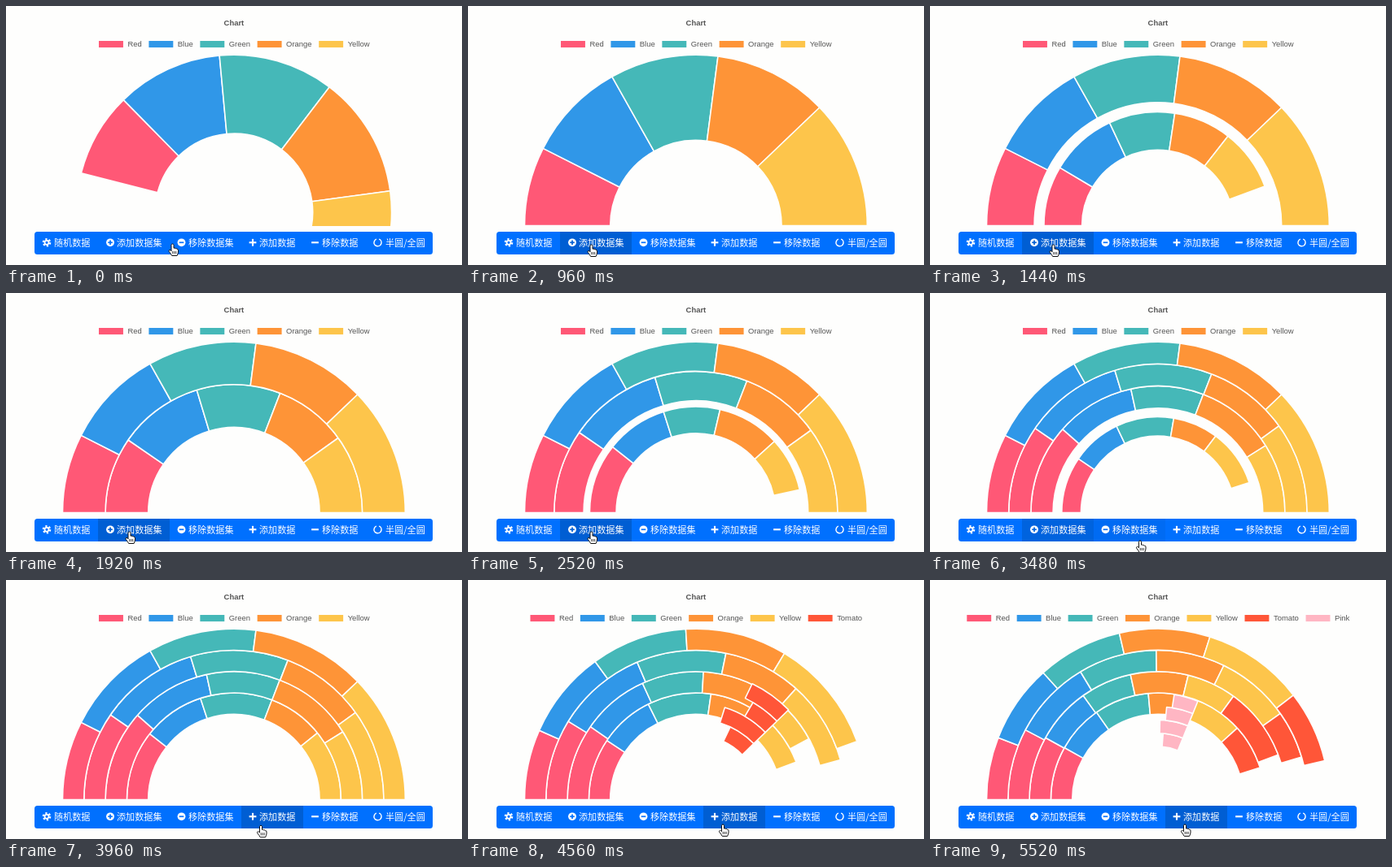
An HTML page with a canvas that plays this animation: 560x319 px, repeating every 5.64 s.

```html
<!DOCTYPE html>
<html lang="zh-CN">
<head>
<meta charset="utf-8">
<title>Chart</title>
<style>
  html, body { margin: 0; height: 100%; overflow: hidden; background: #fefefd; }
  canvas { display: block; }
</style>
</head>
<body>
<canvas width="560" height="319"></canvas>
<script>
const ctx = document.querySelector('canvas').getContext('2d');
const LOOP = 5640, STEP = 120, EASE_MS = 1000;
const BG = '#fefefd', SCALE = 0.787, FONT = 12 * SCALE, BORDER = 2 * SCALE;
const CX = 279.9, TOP = 60.2, RADIUS = 210.4, CHART_BOTTOM = 271;

const labels = [
  ['Red', '#ff5876'], ['Blue', '#3097e8'], ['Green', '#45b8b8'], ['Orange', '#fe9437'],
  ['Yellow', '#fdc54b'], ['Tomato', '#ff5638'], ['Pink', '#ffb6c3']
];

// One row of values per ring, outermost first.
const values = [
  [26.9, 33.8, 36.7, 38.8, 43.8, 31, 28.2],
  [34.6, 38.6, 37.9, 33.2, 35.7, 23.1, 35.4],
  [41.3, 36.4, 33.2, 37.1, 32, 47.7, 51.1],
  [38.1, 33.7, 39, 30.5, 38.7, 32.2, 39.3]
];

// Each click starts a transition from the previous state to this one.
const states = [
  { at: -2000, rings: 1, slices: 5, full: true },
  { at: -368, rings: 1, slices: 5 },
  { at: 1020, rings: 2, slices: 5 },
  { at: 2034, rings: 3, slices: 5 },
  { at: 3045, rings: 4, slices: 5 },
  { at: 4264, rings: 4, slices: 6 },
  { at: 5304, rings: 4, slices: 7 }
];

const buttons = [
  { x: 35, icon: 'gear', iconX: 50, text: '随机数据', textX: 59 },
  { x: 113, icon: 'plusCircle', iconX: 128, text: '添加数据集', textX: 136, hover: [40, 3440] },
  { x: 201, icon: 'minusCircle', iconX: 215.5, text: '移除数据集', textX: 224, hover: [3440, 3615] },
  { x: 289, icon: 'plus', iconX: 303, text: '添加数据', textX: 311, hover: [3615, LOOP] },
  { x: 365, icon: 'minus', iconX: 379.5, text: '移除数据', textX: 388 },
  { x: 441, icon: 'notch', iconX: 456.5, text: '半圆/全圆', textX: 466 }
];
const BAR = { x: 35, y: 278, right: 524, h: 28 };

// time, fingertip x, fingertip y
const pointerPath = [
  [0, 204.5, 293], [300, 151.5, 294], [3240, 151.5, 294],
  [3480, 258, 305], [3720, 313, 305], [4080, 313, 301], [LOOP, 313, 301]
];
const hand = new Path2D('M-1.5 1.3Q-1.3 0 0 0T1.5 1.3V5.2Q2.8 4.6 3.7 5.7Q5 5.2 5.6 6.4Q7 6.2 7 7.8V10Q6.8 12 5.6 14.5H-.8Q-1.8 12.4-4.3 9.4Q-5 8-3.6 7.5Q-2.5 7.4-1.5 8.8Z');

const clamp = v => Math.min(1, Math.max(0, v));
const mix = (a, b, p) => a + (b - a) * p;
const sum = list => list.reduce((a, b) => a + b, 0);

function arcGeometry(state, ring, slice) {
  if (ring >= state.rings || slice >= state.slices) {
    return { start: -Math.PI, end: -Math.PI, outer: 0, inner: 0 };
  }
  const row = values[ring].slice(0, state.slices);
  const before = sum(row.slice(0, slice));
  const rotation = state.full ? -Math.PI / 2 : -Math.PI;
  const unit = (state.full ? 2 : 1) * Math.PI / sum(row);
  const radius = state.full ? RADIUS / 2 : RADIUS;
  const thickness = radius / 2 / state.rings;
  const outer = radius - thickness * ring;
  return {
    start: rotation + before * unit,
    end: rotation + (before + row[slice]) * unit,
    outer,
    inner: outer - thickness
  };
}

function drawArc(arc, cy, color) {
  ctx.beginPath();
  ctx.arc(CX, cy, arc.outer, arc.start, arc.end);
  ctx.arc(CX, cy, arc.inner, arc.end, arc.start, true);
  ctx.closePath();
  ctx.fillStyle = color;
  ctx.fill();
  ctx.strokeStyle = BG;
  ctx.lineWidth = BORDER;
  ctx.lineJoin = 'bevel';
  ctx.stroke();
}

function drawChart(from, to, p) {
  const centerY = s => TOP + (s.full ? RADIUS / 2 : RADIUS);
  const cy = mix(centerY(from), centerY(to), p);
  ctx.save();
  ctx.beginPath();
  ctx.rect(0, 0, 560, CHART_BOTTOM);
  ctx.clip();
  for (let ring = to.rings - 1; ring >= 0; ring--) {
    for (let slice = 0; slice < to.slices; slice++) {
      const a = arcGeometry(from, ring, slice), b = arcGeometry(to, ring, slice);
      const arc = {};
      for (const key in b) arc[key] = mix(a[key], b[key], p);
      drawArc(arc, cy, labels[slice][1]);
    }
  }
  ctx.restore();
}

function drawLegend(count) {
  const family = '"Liberation Sans", Arial, sans-serif';
  ctx.fillStyle = '#555';
  ctx.textBaseline = 'alphabetic';
  ctx.textAlign = 'center';
  ctx.font = `bold ${FONT}px ${family}`;
  ctx.fillText('Chart', CX, 24.2);

  ctx.textAlign = 'left';
  ctx.font = `${FONT}px ${family}`;
  const box = 40 * SCALE, gap = 10 * SCALE, indent = box + FONT / 2;
  const shown = labels.slice(0, count);
  const widths = shown.map(([name]) => indent + ctx.measureText(name).width);
  let x = CX - (sum(widths) + gap * (count - 1)) / 2;
  shown.forEach(([name, color], i) => {
    ctx.fillStyle = color;
    ctx.fillRect(x + BORDER / 2, 43, box - BORDER, FONT - BORDER + 0.2);
    ctx.fillStyle = '#555';
    ctx.fillText(name, x + indent, 50.3);
    x += widths[i] + gap;
  });
}

function drawIcon(kind, x, y, background) {
  const bar = (w, h) => ctx.fillRect(x - w / 2, y - h / 2, w, h);
  const ring = (r, width, start = 0, end = 2 * Math.PI) => {
    ctx.lineWidth = width;
    ctx.beginPath();
    ctx.arc(x, y, r, start, end);
    ctx.stroke();
  };
  ctx.fillStyle = ctx.strokeStyle = '#fff';
  if (kind === 'gear') {
    ring(2.5, 1.8);
    const tooth = 2 * Math.PI * 4 / 12;
    ctx.setLineDash([tooth, tooth]);
    ring(4, 2.6);
    ctx.setLineDash([]);
  } else if (kind === 'notch') {
    ring(4.5, 1.5, -1.2, Math.PI + 1.2);
  } else {
    const circled = kind.endsWith('Circle');
    if (circled) {
      ctx.beginPath();
      ctx.arc(x, y, 4.9, 0, 2 * Math.PI);
      ctx.fill();
      ctx.fillStyle = background;
    }
    const length = circled ? 5.6 : 8.8, width = circled ? 1.7 : 2.1;
    bar(length, width);
    if (kind.startsWith('plus')) bar(width, length);
  }
}

function drawButtons(t) {
  ctx.save();
  ctx.beginPath();
  ctx.roundRect(BAR.x, BAR.y, BAR.right - BAR.x, BAR.h, 3.5);
  ctx.clip();
  ctx.font = '11.1px "Noto Sans CJK SC", "Noto Sans CJK", sans-serif';
  ctx.textAlign = 'left';
  buttons.forEach((b, i) => {
    const [on, off] = b.hover || [LOOP, LOOP];
    const dark = clamp((t - on) / 150) - clamp((t - off) / 150);
    const color = `rgb(0, ${mix(112, 94, dark)}, ${mix(254, 211, dark)})`;
    const right = i + 1 < buttons.length ? buttons[i + 1].x : BAR.right;
    ctx.fillStyle = color;
    ctx.fillRect(b.x, BAR.y, right - b.x, BAR.h);
    drawIcon(b.icon, b.iconX, 291.3, color);
    ctx.fillStyle = '#fff';
    ctx.fillText(b.text, b.textX, 295.7);
  });
  ctx.restore();
}

function drawPointer(t) {
  const i = pointerPath.findIndex(k => k[0] > t);
  const [t0, x0, y0] = pointerPath[i - 1], [t1, x1, y1] = pointerPath[i];
  const p = (t - t0) / (t1 - t0);
  ctx.save();
  ctx.translate(mix(x0, x1, p), mix(y0, y1, p));
  ctx.fillStyle = '#fff';
  ctx.strokeStyle = '#111';
  ctx.lineWidth = 1;
  ctx.lineJoin = 'round';
  ctx.fill(hand);
  ctx.stroke(hand);
  ctx.lineWidth = 0.8;
  ctx.beginPath();
  for (const x of [0.2, 2.2, 4.2]) {
    ctx.moveTo(x, 9);
    ctx.lineTo(x, 12.2);
  }
  ctx.stroke();
  ctx.restore();
}

function render(t) {
  ctx.fillStyle = BG;
  ctx.fillRect(0, 0, 560, 319);
  const current = states.findLastIndex(s => s.at <= t);
  const to = states[current];
  const p = 1 - (1 - clamp((t - to.at) / EASE_MS)) ** 4;
  drawChart(states[current - 1], to, p);
  drawLegend(to.slices);
  drawButtons(t);
  drawPointer(t);
}

const begin = performance.now();
function tick() {
  const t = (performance.now() - begin) % LOOP;
  render(Math.floor(t / STEP) * STEP);
  requestAnimationFrame(tick);
}
tick();
</script>
</body>
</html>
```
